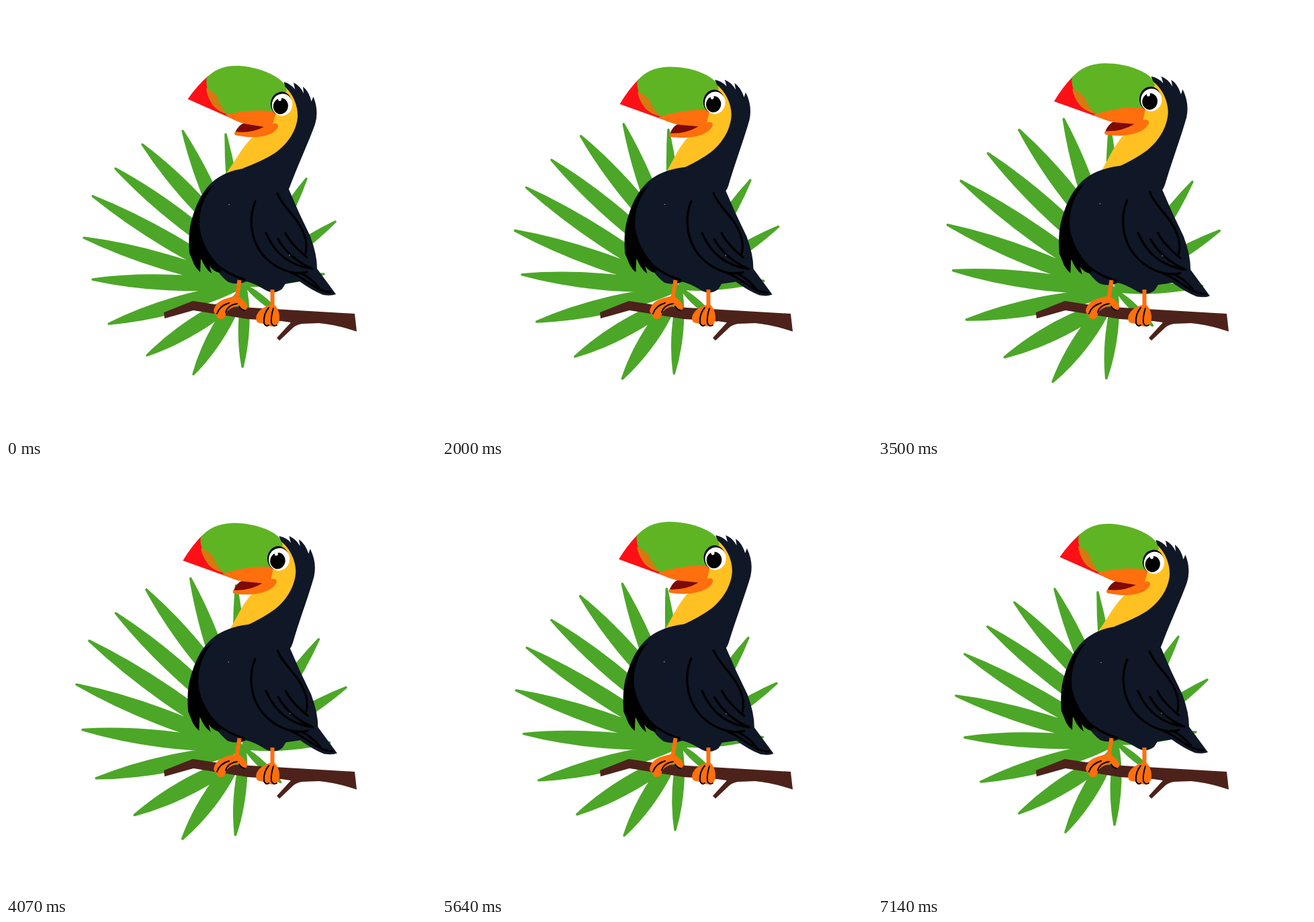
These frames come from a looping animation (640 px wide and 640 px high, 7210 ms). An HTML page:

```html
<!DOCTYPE html>
<html lang="en">
<head>
<meta charset="utf-8">
<title>Toucan on a branch</title>
<style>
  html, body { margin: 0; width: 100%; height: 100%; overflow: hidden; background: #fff; }
  svg { display: block; width: 100%; height: 100%; }
  .ink { fill: none; stroke: #000; stroke-width: 3.2; stroke-linecap: round; stroke-linejoin: round; }
  .thin { stroke-width: 2; }
  .leg { stroke: #ff6f0d; stroke-width: 6; }
</style>
</head>
<body>
<svg viewBox="0 0 640 640">
  <g id="palm" fill="#4ca728" stroke="#4ca728" stroke-width="3.4" stroke-linejoin="round"></g>

  <path fill="#4d221b" d="M235 456 L278 439 L330 447 L400 451 L519 458 L522 484.500 Q490 474 466 472 L440 473 Q430 475 425 481 L407 498 L403 494 L424 471 L410 469 L360 466 L279 453 L236 465Z"/>

  <g id="bird">
    <g id="head">
      <path fill="#101726" d="M416 124 L413.500 113 Q424 116 430 124 L428 114 Q438 119 443 130 L442 120 Q451 127 454.500 142 L457.500 135 Q466 156 460 176 C449 206 434 238 422 270 Q418 282 405 285 L350 272 L352 242 L400 200Z"/>
      <path fill="#ffc122" d="M416 121 C428 132 435 150 434 166 C432 186 419 206 400 219 Q383 230 354 241 Q342 250 319 261 L327 250 C343 229 350 211 368 194 L398 158Z"/>
      <path fill="#ff1016" d="M270.500 138.500 Q284 119 301 104 L318 140 L346 172Z"/>
      <path fill="#5fb424" d="M299 106 C311 94 326 88 347 89 C378 91 405 104 414 116 L418 126 L400 159 L331 163 C314 148 294 127 299 106Z"/>
      <path fill="#d6790f" d="M298 122 Q309 127 315 136 Q318 148 329 161 Q316 157 308 148 Q299 135 298 122Z"/>
      <path fill="#7d0a06" d="M341 188 Q346 177 355 174 L386 179 Q370 191 341 188Z"/>
      <path fill="#ff6f0d" d="M326 162 C350 156 382 153 402 158 L397 175 Q406 174 405 180 C398 196 365 198 341 192 Q339 190 341 187 Q364 190 384 180 L354 175 Q340 171 326 162Z"/>
      <ellipse cx="409.500" cy="145" rx="15.500" ry="17.500" transform="rotate(14 409.500 145)"/>
      <ellipse cx="411" cy="147" rx="15.200" ry="16.500" fill="#fff" transform="rotate(14 411 147)"/>
      <ellipse cx="408.800" cy="149" rx="11" ry="12" transform="rotate(14 408.800 149)"/>
      <ellipse cx="407.500" cy="138.500" rx="2.500" ry="3" fill="#fff"/>
    </g>

    <path fill="#101726" d="M358 241 C336 244 316 252 303 266 C284 286 275 315 274 345 L282 372 L313 391 Q320 403 331 411 Q345 416 358 410 Q370 413 383 421 Q398 431 411 421 L416 413 L437 410 Q455 423 472 430 Q484 432 491 429 L463 391 Q463 370 453 343 Q436 309 421 273 L400 236Z"/>
    <path d="M309 267 C293 276 286 292 280 307 C271 330 272 350 273 368 Q277 377 280 385 Q284 392 289 396 L290 374 Q295 390 306 398 L303 387 Q310 396 318 397 L322 390 C306 377 291 354 288 328 C287 304 294 285 309 267Z"/>
    <path class="ink" d="M305 378 C319 391 337 402 355 407
      M371 291 C362 312 362 345 382 370 C398 389 425 402 448 396
      M404 279 C412 300 434 314 443 338 Q449 352 446 368
      M387 338 C398 364 418 386 456 391
      M405 347 C415 365 434 382 454 390
      M416 338 C423 353 437 365 448 374
      M424 397 C447 405 462 426 484 426
      M437 397 Q451 402 466 419"/>
    <g fill="#9ca3ad"><circle cx="332" cy="295.500" r=".8"/><circle cx="422" cy="371" r=".8"/></g>
  </g>

  <path class="leg" d="M347.500 408 L343 438 M396.500 422 V450"/>
  <g fill="#ff6f0d">
    <path d="M341 432 C330 434 316 438 312 446 Q306 456 313 459 Q313 466 320 466 Q327 465 327 458 Q330 450 345 446 Q350 453 355 453 Q361 451 358 444 Q354 437 347 433Z"/>
    <path d="M393 445 Q378 449 373 460 Q370 471 378 472 Q384 472 384 474 Q386 478 391 476 Q394 477 399 477 Q408 474 407 462 Q406 451 400 445Z"/>
  </g>
  <path class="ink thin" d="M344 443 Q330 445 327 456 M332 442 Q318 446 314 458 M347 447 Q350 452 355 453
    M391 449 Q383 458 384 472 Q387 478 391 475 M398 450 Q394 462 395 472 Q398 478 403 475"/>
</svg>

<script>
  const LOOP = 7210, STEP = 71.4, HALF = 50;
  const byId = id => document.getElementById(id);
  const palm = byId('palm'), bird = byId('bird'), head = byId('head');

  // Leaf tip, relative width, and how far above the hub the leaf is rooted.
  const hub = [356, 416];
  const leaves = [
    [327, 191, .75], [263, 186, 1, 14], [203, 206, 1, 46], [163, 242, 1, 25], [129, 283, 1],
    [116, 345, 1], [129, 407, 1], [153, 473, 1], [210, 520, 1, -12], [279, 548, 1],
    [352, 537, .65], [409, 459, .35], [473, 399, .5], [490, 321, .7], [447, 257, .8]
  ];

  function leafPath([x, y, width, lift = 0]) {
    const root = [hub[0], hub[1] - lift];
    const dx = root[0] - x, dy = root[1] - y, len = Math.hypot(dx, dy);
    const at = (along, side) =>
      `${x + dx * along - dy / len * side * width} ${y + dy * along + dx / len * side * width}`;
    return `M${x} ${y}C${at(.3, 12)} ${at(.7, 15)} ${root}C${at(.7, -15)} ${at(.3, -12)} ${x} ${y}Z`;
  }

  const shape = document.createElementNS('http://www.w3.org/2000/svg', 'path');
  shape.setAttribute('d', leaves.map(leafPath).join(''));
  palm.append(shape);

  const smooth = (from, to, v) => {
    const k = Math.min(1, Math.max(0, (v - from) / (to - from)));
    return k * k * (3 - 2 * k);
  };

  const pose = (node, x, y, angle, scale) => node.setAttribute('transform',
    `translate(${x} ${y}) rotate(${angle}) scale(${scale}) translate(${-x} ${-y})`);

  function draw(now) {
    const step = Math.floor((now % LOOP) / STEP + .1);
    const sway = 1 - Math.abs(1 - step / HALF);
    const breath = (1 - Math.cos(step / 100 * 6 * Math.PI)) / 2;
    const tilt = smooth(0, 22, step) - smooth(74, 99, step);
    pose(palm, 306, 367, 5 * sway, 1 + .081 * sway);
    pose(bird, 384, 341, 0, 1 + .028 * breath);
    pose(head, 386, 212, -4.25 * tilt, 1);
  }

  const start = performance.now();
  function tick() {
    draw(performance.now() - start);
    requestAnimationFrame(tick);
  }
  draw(0);
  requestAnimationFrame(tick);
</script>
</body>
</html>
```
